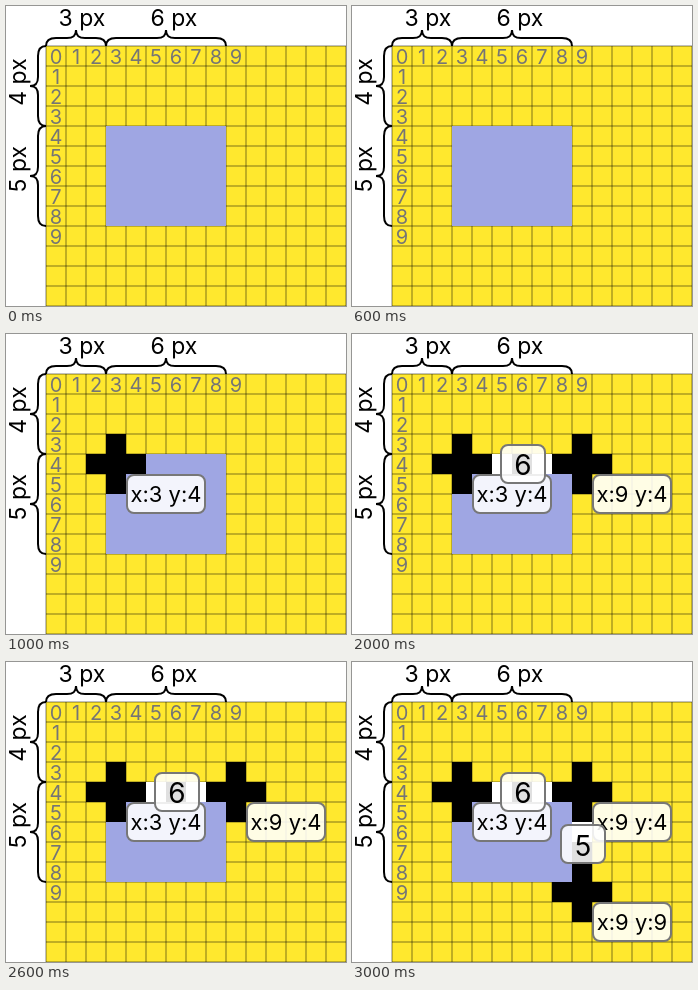
Recreate the animation shown at these times as an HTML page. Size 340 by 300 pixels, loop 4000 ms.

```html
<!DOCTYPE html>
<html lang="en">
<head>
<meta charset="utf-8">
<title>Rectangle edges on a pixel grid</title>
<style>
html, body { margin: 0; width: 100%; height: 100%; overflow: hidden; background: #fff; }
svg { display: block; font-family: Inter, sans-serif; }
text { text-anchor: middle; fill: #000; }
.num { font-size: 20px; fill: #757575; }
.size { font-size: 23px; }
.tip { font-size: 22px; }
.count { font-size: 28px; }
.box { fill: #fff; fill-opacity: .88; stroke: #777; stroke-width: 2; }
.brace { fill: none; stroke: #000; stroke-width: 2; }
.step { opacity: 0; }
</style>
</head>
<body>
<svg id="stage" width="340" height="300" viewBox="0 0 340 300"></svg>
<script>
const CELL = 20, LEFT = 40, TOP = 40, LOOP = 4000;
const stage = document.getElementById('stage');
const px = col => LEFT + col * CELL;
const py = row => TOP + row * CELL;

function add(parent, tag, attrs, text) {
  const el = document.createElementNS('http://www.w3.org/2000/svg', tag);
  for (const key in attrs) el.setAttribute(key, attrs[key]);
  if (text !== undefined) el.textContent = text;
  parent.append(el);
  return el;
}

function cells(parent, col, row, w, h, fill) {
  add(parent, 'rect', { x: px(col), y: py(row), width: w * CELL, height: h * CELL, fill });
}

function label(parent, x, y, w, h, cls, baseline, text) {
  add(parent, 'rect', { class: 'box', x: x + 1, y: y + 1, width: w - 2, height: h - 2, rx: 7 });
  add(parent, 'text', { class: cls, x: x + w / 2, y: baseline }, text);
}

function corner(parent, col, row) {
  cells(parent, col - 1, row, 3, 1, '#000');
  cells(parent, col, row - 1, 1, 3, '#000');
  label(parent, px(col + 1), py(row + 1), 80, 40, 'tip', py(row + 1) + 28, `x:${col} y:${row}`);
}

// Brace along +x from 0 to len, with its tip pointing up
function brace(len, transform) {
  const m = len / 2;
  add(stage, 'path', {
    class: 'brace', transform,
    d: `M0 0C0 -5 3 -8 10 -8H${m - 9}C${m - 3} -8 ${m} -10 ${m} -16` +
       `C${m} -10 ${m + 3} -8 ${m + 9} -8H${len - 10}C${len - 3} -8 ${len} -5 ${len} 0`
  });
}

function grid() {
  add(stage, 'rect', { x: LEFT, y: TOP, width: 300, height: 260, fill: '#ffe82e' });
  let d = '';
  for (let x = LEFT; x <= 340; x += CELL) d += `M${x} ${TOP}V300`;
  for (let y = TOP; y <= 300; y += CELL) d += `M${LEFT} ${y}H340`;
  add(stage, 'path', { d, stroke: '#000', 'stroke-opacity': .5, fill: 'none' });
  cells(stage, 3, 4, 6, 5, '#9fa6e3');
  for (let i = 0; i < 10; i++) {
    add(stage, 'text', { class: 'num', x: px(i) + 10, y: 58 }, i);
    if (i) add(stage, 'text', { class: 'num', x: 50, y: py(i) + 18 }, i);
  }
}

function sizes() {
  brace(60, 'translate(40 40)');
  brace(120, 'translate(100 40)');
  brace(80, 'translate(40 120) rotate(-90)');
  brace(100, 'translate(40 220) rotate(-90)');
  add(stage, 'text', { class: 'size', x: 76, y: 20 }, '3 px');
  add(stage, 'text', { class: 'size', x: 168, y: 20 }, '6 px');
  add(stage, 'text', { class: 'size', transform: 'translate(20 76) rotate(-90)' }, '4 px');
  add(stage, 'text', { class: 'size', transform: 'translate(20 163) rotate(-90)' }, '5 px');
}

const steps = [
  [1000, g => corner(g, 3, 4)],
  [2000, g => {
    corner(g, 9, 4);
    for (let i = 0; i < 3; i++) cells(g, 5 + i, 4, 1, 1, i % 2 ? '#000' : '#fff');
    label(g, 148, 110, 46, 40, 'count', 141, '6');
  }],
  [3000, g => {
    corner(g, 9, 9);
    for (let i = 0; i < 2; i++) cells(g, 9, 6 + i, 1, 1, i % 2 ? '#000' : '#fff');
    label(g, 208, 162, 46, 40, 'count', 194, '5');
  }]
];

grid();
sizes();
for (const [start, draw] of steps) {
  const g = add(stage, 'g', { class: 'step' });
  draw(g);
  g.animate([
    { opacity: 0, offset: 0, easing: 'step-end' },
    { opacity: 1, offset: start / LOOP },
    { opacity: 1, offset: 1 }
  ], { duration: LOOP, iterations: Infinity }).startTime = 0;
}
</script>
</body>
</html>
```
